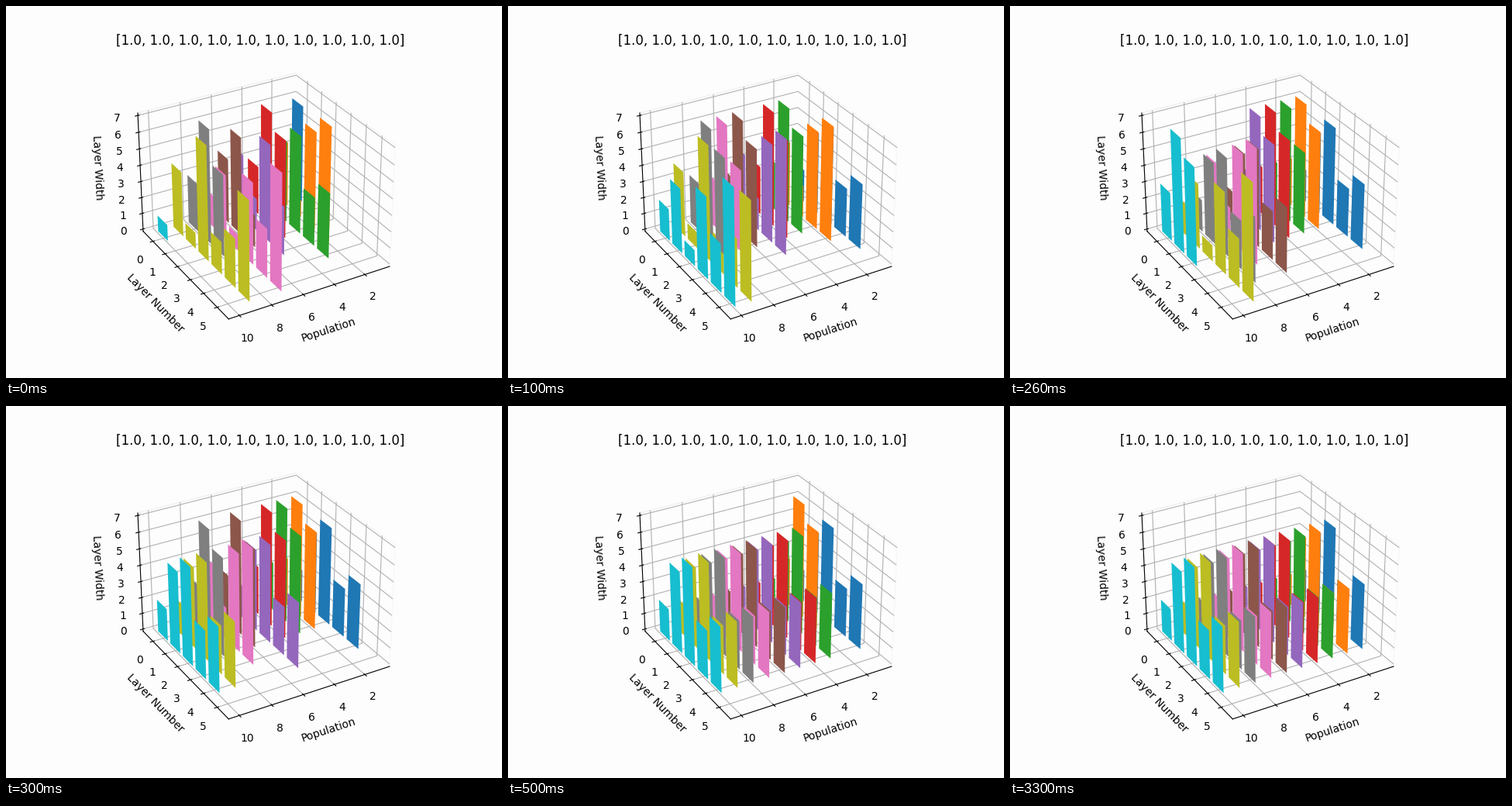
Write a matplotlib script that moves like this. It is 640x480 px and loops after 5.1 s.

```python
import matplotlib.pyplot as plt
from matplotlib.animation import FuncAnimation

PAPER = "#fdfdfd"
FRAMES, INTERVAL = 51, 100
VIEW_MARGIN = 1 / 48

# Layer widths of the networks that recur while the population converges
BEST = [2, 5, 6, 3, 4]
SHORT = [3, 7, 6]
SLIM = [3, 7, 5]
STEEP = [4, 2, 6, 7]
DEEP = [2, 4, 1, 5, 3, 7]
WIDE = [4, 1, 7, 2, 3, 6]

# One row per generation, individuals 1 to 10
GENERATIONS = [
    [[6], STEEP, BEST, SHORT, [4, 2, 6, 3], [4, 6, 2], DEEP, SLIM, WIDE, [1]],
    [BEST, STEEP, SHORT, SHORT, STEEP, SHORT, SLIM, SHORT, WIDE, DEEP],
    [BEST, SHORT, SLIM, SHORT, SHORT, BEST, STEEP, BEST, DEEP, SHORT],
    [BEST, SHORT, SHORT, SHORT, BEST, SHORT, STEEP, SHORT, BEST, BEST],
    [BEST, BEST, BEST, BEST, SHORT, SHORT, BEST, BEST, BEST, SHORT],
    [BEST, SHORT] + [BEST] * 8,
    [BEST] * 10,
]

fig = plt.figure(figsize=(6.4, 4.8), dpi=100, facecolor=PAPER)
ax = fig.add_subplot(projection="3d", facecolor=PAPER)
ax.view_init(elev=30, azim=60)
ax.set_title(str([1.0] * 10))
ax.set_xlabel("Population")
ax.set_ylabel("Layer Number")
ax.set_zlabel("Layer Width")
ax.set_xticks(range(2, 11, 2))
ax.set_yticks(range(6))
ax.set_zticks(range(8))
ax.set_xlim(0.55, 10.45, view_margin=VIEW_MARGIN)
ax.set_ylim(-0.69, 5.69, view_margin=VIEW_MARGIN)
ax.set_zlim(0, 7, view_margin=VIEW_MARGIN)
for axis in (ax.xaxis, ax.yaxis, ax.zaxis):
    axis.pane.set_facecolor(PAPER)

bars = []


def show_generation(frame):
    while bars:
        bars.pop().remove()
    networks = GENERATIONS[min(frame, len(GENERATIONS) - 1)]
    for i, widths in enumerate(networks):
        bars.append(ax.bar(range(len(widths)), widths, zs=i + 1, zdir="x",
                           color=f"C{i}"))
    return []


anim = FuncAnimation(fig, show_generation, frames=FRAMES, interval=INTERVAL,
                     init_func=lambda: show_generation(0), repeat=True,
                     repeat_delay=0, blit=False)
plt.show()
```
